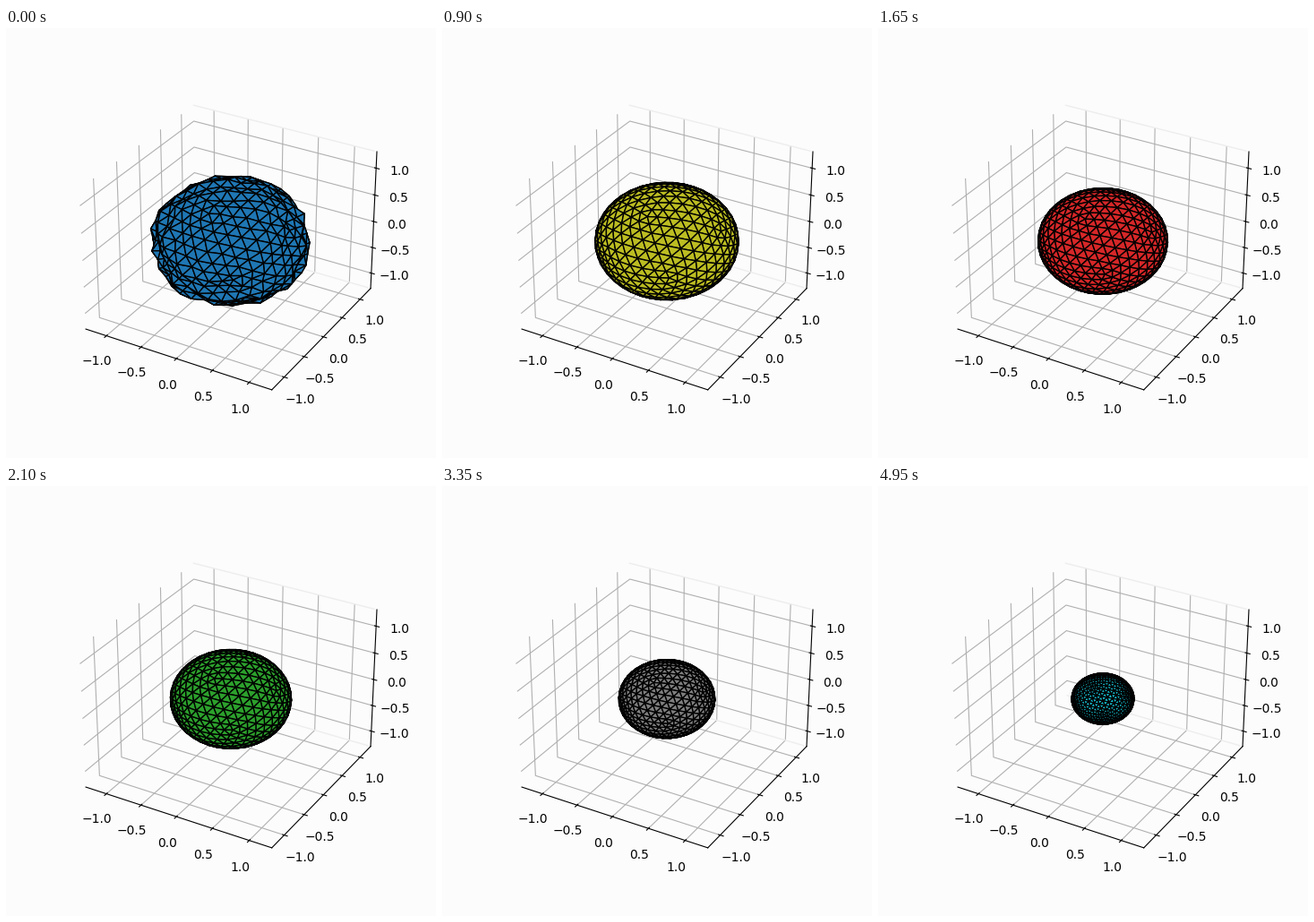
A matplotlib script for the animation above (5 s loop, 480x480 px).

```python
from itertools import combinations

import numpy as np
import matplotlib.pyplot as plt
from matplotlib.animation import FuncAnimation
from mpl_toolkits.mplot3d.art3d import Poly3DCollection

FRAMES = 100
INTERVAL = 50
LIMIT = 1.25 * 25 / 24
PAPER = "#fcfcfc"


def icosahedron():
    """Corner triples of the 20 faces."""
    golden = (1 + 5 ** 0.5) / 2
    corners = [np.roll((0, a, b * golden), shift)
               for shift in range(3) for a in (-1, 1) for b in (-1, 1)]
    return [trio for trio in combinations(corners, 3)
            if all(np.isclose(np.linalg.norm(p - q), 2)
                   for p, q in combinations(trio, 2))]


def geodesic_sphere(parts):
    """Unit sphere with each icosahedron edge cut into equal parts."""
    triangles = []
    for a, b, c in icosahedron():
        u, v = (b - a) / parts, (c - a) / parts
        for i in range(parts):
            for j in range(parts - i):
                p = a + i * u + j * v
                triangles.append((p, p + u, p + v))
                if i + j < parts - 1:
                    triangles.append((p + u, p + u + v, p + v))
    flat = np.array(triangles).reshape(-1, 3)
    flat /= np.linalg.norm(flat, axis=1, keepdims=True)
    verts, index = np.unique(flat.round(6) + 0.0, axis=0, return_inverse=True)
    return verts, index.reshape(-1, 3)


def neighbour_mean(count, faces):
    """Matrix that replaces each value by the mean of its neighbours."""
    links = np.zeros((count, count))
    for i, j in combinations(range(3), 2):
        links[faces[:, i], faces[:, j]] = 1
        links[faces[:, j], faces[:, i]] = 1
    return links / links.sum(axis=1, keepdims=True)


points, faces = geodesic_sphere(7)
smooth = neighbour_mean(len(points), faces)

# Rough start that the flow evens out step by step
rng = np.random.default_rng(4)
bumps = [rng.uniform(-0.07, 0.025, len(points))]
for _ in range(FRAMES - 1):
    bumps.append(0.8 * smooth @ bumps[-1])


def mesh(n):
    radius = 0.975 - 0.00529 * n - 7.06e-6 * n * n
    surface = points * (radius * (1 + bumps[n]))[:, None]
    return surface[faces]


fig = plt.figure(figsize=(4.8, 4.8), dpi=100, facecolor=PAPER)
ax = fig.add_subplot(111, projection="3d", facecolor=PAPER)
# Faint edges of the back wall
for z in (-LIMIT, LIMIT):
    ax.plot([-LIMIT, 0.97 * LIMIT], [LIMIT, LIMIT], [z, z],
            color="#ededed", lw=1)
ax.set_xlim(-LIMIT, LIMIT)
ax.set_ylim(-LIMIT, LIMIT)
ax.set_zlim(-LIMIT, LIMIT)
for axis in (ax.xaxis, ax.yaxis, ax.zaxis):
    axis.set_ticks(np.arange(-1, 1.1, 0.5))
    axis.set_pane_color(PAPER)

ball = Poly3DCollection(mesh(0), facecolors="C0", edgecolors="black",
                        linewidths=1)
ax.add_collection3d(ball)


def update(n):
    ball.set_verts(mesh(n))
    ball.set_facecolor(f"C{n % 10}")
    return (ball,)


anim = FuncAnimation(fig, update, frames=FRAMES, interval=INTERVAL,
                     repeat=True, repeat_delay=0, blit=False)
plt.show()
```
